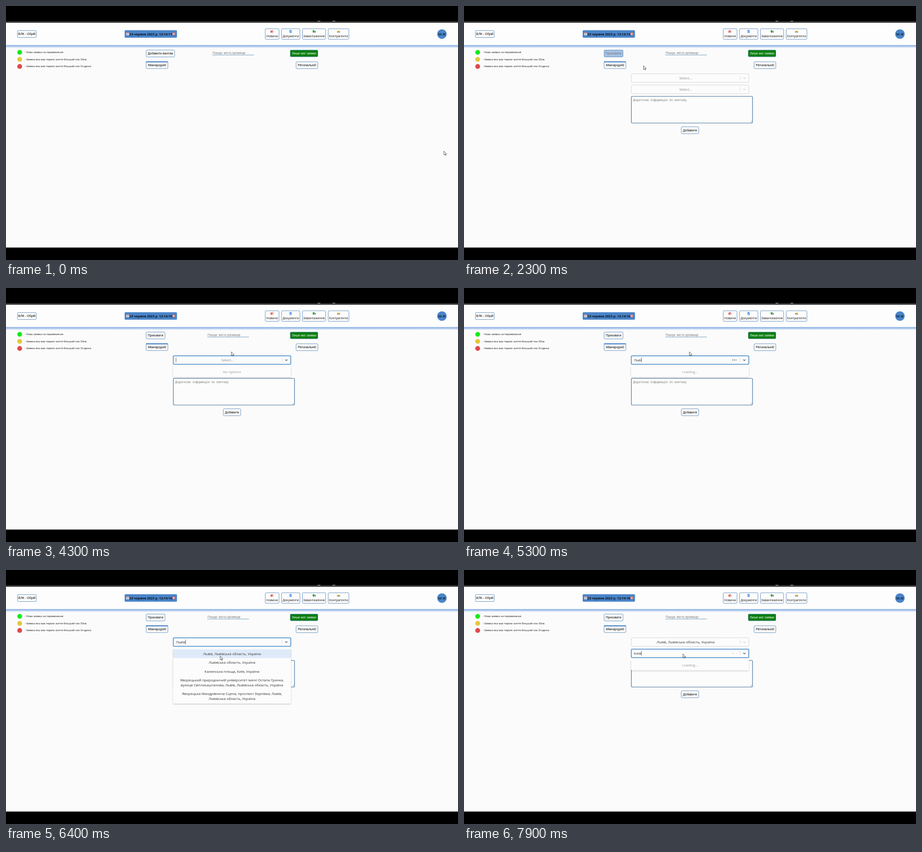
Recreate the animation shown at these times as an HTML page. Size 998x561 px, loop 8 s.

```html
<!DOCTYPE html>
<html lang="uk">
<head>
<meta charset="utf-8">
<title>Заявки</title>
<style>
html, body { margin: 0; width: 100%; height: 100%; overflow: hidden; background: #000; }
svg { display: block; width: 998px; height: 561px; }
text { font: 7.8px "Open Sans", "Noto Sans", sans-serif; fill: #333; white-space: pre; }
.mid { text-anchor: middle; }
.btn rect { fill: #fdfdfd; stroke: #5585b5; stroke-width: .9; }
.btn text { font: 6.93px "Liberation Sans", Arial, sans-serif; fill: #000; text-anchor: middle; }
.nav text { font: 6.78px "Open Sans", "Noto Sans", sans-serif; fill: #111; }
.legend text { font-size: 5.87px; fill: #111; }
.date { font-weight: 700; font-size: 7.2px; fill: #0a0f18; }
.search { font: 6.93px "Liberation Sans", Arial, sans-serif; fill: #777; }
.note { font: 6.35px "Noto Sans Mono", "DejaVu Sans Mono", monospace; fill: #777; }
.hint { fill: #858585; }
.message { fill: #999; }
.hidden { display: none; }
</style>
</head>
<body>
<svg id="stage" viewBox="0 0 998 561">
  <defs>
    <linearGradient id="glow" x2="0" y2="1">
      <stop offset="0" stop-color="#73a1dd"/>
      <stop offset=".35" stop-color="#a9c6ee"/>
      <stop offset="1" stop-color="#fbfbfb"/>
    </linearGradient>
    <filter id="soft" x="-5%" y="-15%" width="110%" height="140%">
      <feDropShadow dx="0" dy="1.5" stdDeviation="1.4" flood-opacity=".2"/>
    </filter>
  </defs>
  <rect width="998" height="561"/>
  <rect y="33.5" width="998" height="4" fill="#383838"/>
  <path d="M688 33q3 2 6 0M721 33q3 2 6 0" fill="none" stroke="#ddd"/>
  <rect y="37" width="998" height="496.5" fill="#fbfbfb"/>
  <rect y="37" width="998" height="49.5" fill="#fdfdfd"/>
  <rect y="86.5" width="998" height="6.5" fill="url(#glow)"/>

  <rect x="262" y="53.5" width="115.5" height="16.5" rx="2" fill="#4a84c8"/>
  <g>
    <rect x="265.3" y="58.5" width="6.4" height="6.3" rx=".8" fill="#dfe5ea"/>
    <path d="M265.3 59.5h6.4" stroke="#d0605a" stroke-width="1.4"/>
    <path d="M266.5 62h4M266.5 63.6h4" stroke="#8795a5" stroke-width=".7"/>
    <circle cx="370.5" cy="61.6" r="2.7" fill="#f4eeee" stroke="#d25750" stroke-width="1.1"/>
    <path d="M370.5 60v1.8h1.2" fill="none" stroke="#555" stroke-width=".6"/>
  </g>
  <text id="clock" class="date" x="272.3" y="64.7"></text>

  <circle cx="962.5" cy="62" r="10.5" fill="#4a84c8"/>
  <text class="mid" x="962.6" y="64.9" style="font-weight:600;fill:#0b1420">М.Ж</text>

  <g id="buttons"></g>
  <path d="M309 123.4h48.5" stroke="#4a84c8" stroke-width="2.2"/>

  <g>
    <path d="M584 54.5l5-1.2v5l-5 1z" fill="#e0635c"/>
    <path d="M587 54.5h3.5v4.5h-3.5z" fill="#e8a19c"/>
    <path d="M626 53h3.5l1.5 1.5v5h-5z" fill="#5b9be6"/>
    <path d="M627 56h3M627 57.8h3" stroke="#dcebfb" stroke-width=".6"/>
    <path d="M677 53.8h4.2v4h-4.2zM681.6 55h2.2v2.8h-2.2z" fill="#3f9c45"/>
    <path d="M678.2 58.6h1.6M681.6 58.6h1.6" stroke="#333"/>
    <path d="M731 57l1-2.4h4.5l1.2 2.4z" fill="#d9b84a"/>
    <path d="M730.8 57.8h7" stroke="#6b6b5c" stroke-width="1.2"/>
  </g>

  <g id="search">
    <text class="search" x="456" y="106.2">Пошук: місто,прізвище</text>
    <path d="M455.5 108.2h92" stroke="#5b8fb5" stroke-width=".9"/>
  </g>
  <g id="legend" class="legend"></g>

  <g id="form">
    <rect x="369.5" y="199.5" width="267.5" height="59" rx="2.5" fill="#fcfcfc" stroke="#3f6f9f" stroke-width="1.2"/>
    <path d="M632 257l4-4M634.3 257l1.7-1.7" stroke="#888" stroke-width=".6"/>
    <text class="note" x="373.5" y="209.6">Додаткова інформація по вантажу</text>
    <g id="submit"></g>
    <g id="fields"></g>
    <g id="menu">
      <rect id="panel" x="369" width="260" rx="2" fill="#fcfcfc" filter="url(#soft)"/>
      <text id="message" class="mid message" x="499"></text>
      <g id="options">
        <rect x="369" y="175.2" width="260" height="19.3" fill="#deeaf9"/>
      </g>
    </g>
    <path id="caret" stroke="#222" stroke-width=".7"/>
  </g>

  <g id="pointer">
    <path id="arrow" d="M0 0V8.4L2 6.7L3.4 9.6L4.7 9L3.4 6.2H5.9Z" fill="#fff" stroke="#222" stroke-width=".75"/>
    <path id="hand" d="M-1 .8Q0-.6 1 .8V4.2L5.6 5.2Q7 5.6 6.6 7.4L5.6 11.6H.4L-2.6 7.2Q-2.8 5.6-1 6.6Z" fill="#fff" stroke="#222" stroke-width=".75"/>
  </g>
</svg>
<script>
const LOOP = 8000, CLICK = 2050, FOCUS = 2800, PICK = 6500, NEXT = 6600;
const $ = id => document.getElementById(id);
const show = (el, on) => el.classList.toggle('hidden', !on);
const clamp = v => Math.max(0, Math.min(1, v));
const ramp = (t, from, span) => clamp((t - from) / span);
const mix = (a, b, k) => `rgb(${a.map((v, i) => Math.round(v + (b[i] - v) * k))})`;
const lastBefore = (steps, t) => steps.filter(s => s[0] <= t).pop();

function add(parent, tag, attrs, content = '') {
  const el = document.createElementNS('http://www.w3.org/2000/svg', tag);
  for (const key in attrs) el.setAttribute(key, attrs[key]);
  el.textContent = content;
  parent.append(el);
  return el;
}

function button(parent, label, x, y, w, h = 15.2, kind = '') {
  const g = add(parent, 'g', { class: 'btn ' + kind });
  const box = add(g, 'rect', { x, y, width: w, height: h, rx: 2 });
  const text = add(g, 'text', { x: x + w / 2, y: y + (kind ? 19.1 : 9.9) }, label);
  return { box, text };
}

const buttons = $('buttons');
button(buttons, 'ВЛК - Обрій', 25.3, 54.3, 41.5);
[['Новини', 572.4, 30.4], ['Документи', 608.4, 40.6], ['Завантаження', 654.5, 51.2], ['Контрагенти', 711.4, 45.7]]
  .forEach(([label, x, w]) => button(buttons, label, x, 50.3, w, 23.2, 'nav'));
const toggle = button(buttons, '', 309.4, 97.3, 63);
const mine = button(buttons, 'Лише мої заявки', 627.7, 97.3, 60.8, 14.8);
mine.box.style.fill = '#087d0b';
mine.text.style.fill = '#fff';
button(buttons, 'Міжнародні0', 309.4, 122.9, 48);
button(buttons, 'Регіональні0', 640.5, 123.2, 48);
button($('submit'), 'Добавити', 479.8, 266.8, 38.4);

[['#18e91c', 'Нова заявка на перевезення'],
 ['#e3c73e', 'Заявка яка має термін життя більший ніж 30хв'],
 ['#dd4a4c', 'Заявка яка має термін життя більший ніж 3години']].forEach(([fill, label], i) => {
  const y = 102.2 + i * 15.6;
  add($('legend'), 'circle', { cx: 30.2, cy: y, r: 5.3, fill });
  add($('legend'), 'text', { x: 41, y: y + 1.7 }, '- ' + label);
});

const CITY = 'Львів, Львівська область, Україна';
[[185, CITY],
 [204.5, 'Львівська область, Україна'],
 [224, 'Калинська площа, Київ, Україна'],
 [243, 'Яворецький природничий університет імені Остапа Гринка,'],
 [254, 'вулиця Світлокаштанова, Львів, Львівська область, Україна'],
 [273, 'Яворецька Мандрівнича Сцена, проспект Зернівка, Львів,'],
 [284, 'Львівська область, Україна']].forEach(([y, line]) =>
  add($('options'), 'text', { x: 499, y: y + 2.8, class: 'mid' }, line));

function field(y) {
  const g = add($('fields'), 'g', {}), c = y + 9.7;
  return {
    mid: c,
    box: add(g, 'rect', { x: 369.4, y: y + .4, width: 259.4, height: 18.8, rx: 2, fill: '#fcfcfc' }),
    line: add(g, 'path', { d: `M609.5 ${c - 5.2}v10.6`, stroke: '#ccc', 'stroke-width': .7 }),
    chevron: add(g, 'path', { d: `M616.4 ${c - 1.2}l2.6 2.6l2.6-2.6`, fill: 'none', 'stroke-width': 1.1 }),
    label: add(g, 'text', { x: 489.3, y: c + 2.9, class: 'mid' }),
    typed: add(g, 'text', { x: 375, y: c + 2.9 }),
    dots: [594, 598, 602].map(cx => add(g, 'circle', { cx: cx - .5, cy: c, r: 1.2, fill: '#444' }))
  };
}
const fields = [field(149.3), field(174.3)];

// Each entry: time, then what holds from that time on.
const typing = [
  [[0, ''], [3800, 'K'], [3900, 'Km'], [4200, ''], [4800, 'Л'], [4950, 'Ль'], [5100, 'Льв'], [5250, 'Льві'], [5400, 'Львів'], [PICK, '']],
  [[0, ''], [7400, 'К'], [7500, 'Ки'], [7700, 'Киї'], [7800, 'Київ']]
];
const ticks = [0, 500, 1700, 2700, 3900, 5200, 6500, 7400];
const route = [
  [0, 967, 320.5], [600, 966, 320], [1000, 700, 215], [1300, 310, 102], [1500, 353.5, 99.3],
  [2050, 353.5, 99.3], [2300, 396.5, 131.8], [2450, 410, 138], [2750, 490, 158], [2850, 490, 158],
  [3050, 497.7, 141], [5600, 497.7, 141], [5850, 471.7, 193], [6400, 473, 190], [6600, 483.5, 185.3]
];

function position(t) {
  const i = route.findIndex(p => p[0] > t);
  if (i < 0) return route[route.length - 1].slice(1);
  const [a, b] = [route[i - 1], route[i]];
  const k = ramp(t, a[0], b[0] - a[0]), e = k * k * (3 - 2 * k);
  return [a[1] + (b[1] - a[1]) * e, a[2] + (b[2] - a[2]) * e];
}

function drawField(f, t, focus, word, loading, value) {
  const grey = [204, 204, 204];
  f.box.setAttribute('stroke', mix(grey, [58, 130, 198], focus));
  f.box.setAttribute('stroke-width', .8 + .7 * focus);
  f.chevron.setAttribute('stroke', mix(grey, [64, 64, 64], focus));
  f.label.textContent = word ? '' : value || 'Select...';
  f.label.setAttribute('class', value ? 'mid' : 'mid hint');
  f.typed.textContent = word;
  f.dots.forEach((dot, i) => {
    const p = ((t - 160 * i + 1200) % 1000) / 1000;
    dot.setAttribute('opacity', loading ? clamp(p < .4 ? p / .4 : (.8 - p) / .4) : 0);
  });
}

function draw(t) {
  const open = t >= CLICK, active = t >= NEXT ? 1 : 0;
  const focused = t >= FOCUS;
  const tick = ticks.filter(v => v <= t).length;
  $('clock').textContent = `23 червня 2023 р. 12:14:${10 + tick}`;

  const hover = open ? 1 - ramp(t, CLICK, 500) : ramp(t, 1600, 350);
  toggle.box.style.fill = mix([253, 253, 253], [74, 132, 200], hover);
  toggle.text.style.fill = mix([0, 0, 0], [240, 240, 240], hover);
  toggle.text.textContent = open ? 'Приховати' : 'Добавити вантаж';
  toggle.box.setAttribute('width', open ? 41.6 : 63);
  toggle.text.setAttribute('x', open ? 330.2 : 340.9);
  $('search').setAttribute('transform', `translate(${open ? -11 : 0})`);
  show($('form'), open);

  const steps = typing.map(list => lastBefore(list, t));
  const words = steps.map(s => s[1]);
  const listed = t >= 5600 && t < PICK;
  const loading = words[active] !== '' && !listed;
  drawField(fields[0], t, ramp(t, FOCUS - 50, 100) * (1 - ramp(t, NEXT - 50, 300)), words[0], loading && !active, t >= PICK && CITY);
  drawField(fields[1], t, ramp(t, NEXT - 50, 200), words[1], loading && active, '');

  show($('menu'), focused && (t < PICK || active));
  const top = active ? 198 : 173;
  $('panel').setAttribute('y', top);
  $('panel').setAttribute('height', listed ? 122 : 23.5);
  $('message').setAttribute('y', top + 14.9);
  $('message').textContent = listed ? '' : loading ? 'Loading...' : 'No options';
  show($('options'), listed);

  const since = Math.max(active ? 6800 : FOCUS, steps[active][0]);
  const blink = t < since || Math.floor((t - since) / 500) % 2 === 0;
  show($('caret'), focused && blink && (t < PICK || active));
  const f = fields[active];
  const x = 375.4 + (words[active] && open ? f.typed.getComputedTextLength() : 0);
  $('caret').setAttribute('d', `M${x} ${f.mid - 5.5}v10.6`);

  $('pointer').setAttribute('transform', `translate(${position(t)})`);
  const hand = t >= 1450 && t < CLICK;
  show($('hand'), hand);
  show($('arrow'), !hand);
}

const start = performance.now();
function frame() {
  const t = (performance.now() - start) % LOOP;
  draw(Math.floor(t / 100) * 100);
  requestAnimationFrame(frame);
}
frame();
</script>
</body>
</html>
```
